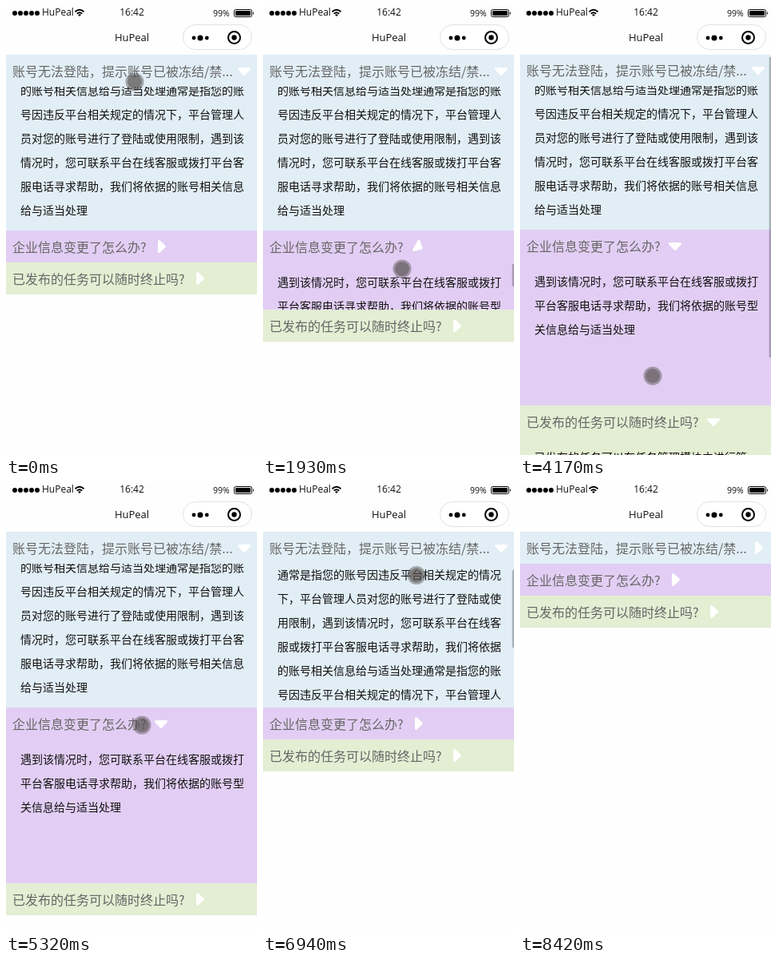
An HTML page for the animation above (9030 ms loop, 314x562 px).

```html
<!DOCTYPE html>
<html lang="zh-CN">
<head>
<meta charset="utf-8">
<style>
  html, body { margin: 0; width: 100%; height: 100%; overflow: hidden; background: #fff; }
  #stage { display: block; width: 314px; height: 562px; }
  text { font-family: "Noto Sans CJK SC", "Noto Sans CJK", sans-serif; text-spacing-trim: space-all; }
  .latin { font-family: "Open Sans", "Noto Sans", sans-serif; fill: #111; }
  .title { font-size: 16px; fill: #666; }
  .line { font-size: 14px; fill: #111; }
  .bar { fill: #000; fill-opacity: .26; }
</style>
</head>
<body>
<svg id="stage" viewBox="0 0 314 562">
  <rect width="314" height="562" fill="#fefefe"/>
  <svg id="page" y="61" width="314" height="501"></svg>
  <path d="M11 9h28.500" stroke="#000" stroke-width="6" stroke-linecap="round" stroke-dasharray="0 7"/>
  <text class="latin" x="45" y="12" font-size="12">HuPeal</text>
  <path d="M86.500 7.200Q92 2.400 97.500 7.200M88.700 9.600Q92 6.800 95.300 9.600" fill="none" stroke="#000" stroke-width="1.800"/>
  <path d="M92 13l-2-2q2-1.500 4 0z"/>
  <text class="latin" x="157.500" y="12" font-size="12" text-anchor="middle">16:42</text>
  <text class="latin" x="259" y="13" font-size="10.500">99%</text>
  <rect x="285.500" y="4.500" width="22" height="9" rx="2" fill="none" stroke="#000"/>
  <rect x="287" y="6" width="19" height="6" rx="1"/>
  <path d="M309 7q2 2 0 4z"/>
  <text class="latin" x="157.500" y="44" font-size="13" text-anchor="middle">HuPeal</text>
  <rect x="221.500" y="23.500" width="86" height="31" rx="15.500" fill="#fff" stroke="#e2e2e2"/>
  <circle cx="235" cy="40" r="2.400"/>
  <circle cx="243" cy="40" r="3.500"/>
  <circle cx="251.300" cy="40" r="2.400"/>
  <circle cx="285.500" cy="39.500" r="7.500" fill="none" stroke="#000" stroke-width="2"/>
  <circle cx="285.500" cy="39.500" r="3.200"/>
  <g id="touch">
    <circle r="11.500" fill="#55504e" fill-opacity=".45"/>
    <circle r="9" fill="#55504e" fill-opacity=".5"/>
  </g>
</svg>
<script>
const LOOP = 9030, TICKS = 117;
const VIEW = 501, HEAD = 40, OPEN = 180, LINE = 30, PADDING = 10;
const FOLD_TICKS = 5.2, BAR_LINGER = 3;

// All times are in ticks; a panel folds or unfolds at each of its toggles.
const panels = [
  {
    color: "#e2eef6", arrowX: 298, title: "账号无法登陆，提示账号已被冻结/禁...",
    text: ("通常是指您的账号因违反平台相关规定的情况下，平台管理人员对您的账号进行了登陆或使用限制，"
      + "遇到该情况时，您可联系平台在线客服或拨打平台客服电话寻求帮助，"
      + "我们将依据的账号相关信息给与适当处理").repeat(2),
    startOpen: 1, startScroll: 140, toggles: [3, 15, 102]
  },
  {
    color: "#e2cef4", arrowX: 194, title: "企业信息变更了怎么办?",
    text: "遇到该情况时，您可联系平台在线客服或拨打平台客服电话寻求帮助，"
      + "我们将依据的账号型关信息给与适当处理",
    startOpen: 0, startScroll: 0, toggles: [23, 70]
  },
  {
    color: "#e3eed3", arrowX: 242, title: "已发布的任务可以随时终止吗?",
    text: "已发布的任务可以在任务管理模块中进行管理，任务在“待审核”与“已通过”状态是可关闭，"
      + "如遇到必须关闭情况，您可联系平台在线客服或拨打平台客服电话寻求帮助，"
      + "我们将依据的任务相关信息给与适当处理）",
    startOpen: 0, startScroll: 0, toggles: [36, 62]
  }
];

const drag = (target, from, to, x, y, speed) => ({ target, from, to, x, y, speed });
const tap = (at, x, y, drift = 17) => drag(null, at, at + 1, x, y, drift);

const touches = [
  tap(0, 161, 95, -17),
  tap(12, 160, 78, 0),
  tap(24, 174, 312),
  tap(34, 166, 522),
  drag("page", 41, 45, 226, 616, -44),
  drag("page", 49, 55, 166, 305, 31.6),
  tap(59, 166, 524, 0),
  tap(69, 170, 303, 0),
  drag(panels[0], 78, 84, 205, 121, 22.3),
  drag(panels[0], 86, 97, 192, 120, -1.1),
  tap(98, 190, 98, -9)
];

const clamp = (x, low, high) => Math.min(Math.max(x, low), high);
const smooth = x => x * x * (3 - 2 * x);
const dragged = (touch, tick) => touch.speed * (clamp(tick, touch.from, touch.to) - touch.from);
const dragsOf = target => touches.filter(touch => touch.target === target);

// Twenty characters per line; closing punctuation never starts one.
const wrap = text => text.match(/.{1,20}(?![，）])/g);

function openness({ startOpen, toggles }, tick) {
  return toggles.reduce((sum, at, i) => {
    const step = smooth(clamp((tick - at) / FOLD_TICKS, 0, 1));
    return sum + (i % 2 === startOpen ? step : -step);
  }, startOpen);
}

function scrollOf(target, start, max, tick) {
  return dragsOf(target).reduce((scroll, touch) =>
    clamp(scroll - dragged(touch, tick), 0, Math.max(0, max)), start);
}

function barShown(panel, tick) {
  const within = (from, to) => tick >= from && tick <= to + BAR_LINGER;
  return panel.toggles.some(at => within(at, at + FOLD_TICKS))
    || dragsOf(panel).some(touch => within(touch.from, touch.to));
}

function set(node, attributes) {
  for (const name in attributes) node.setAttribute(name, attributes[name]);
}

function placeBar(node, top, view, content, scroll, shown) {
  set(node, {
    y: top + 2 + scroll * view / content,
    height: Math.max(0, view * view / content - 4),
    opacity: shown && content > view + 1 ? 1 : 0
  });
}

const page = document.getElementById("page");
const touchMark = document.getElementById("touch");

function build() {
  const bar = '<rect class="bar" x="311.7" width="2.3" rx="1"/>';
  page.innerHTML = `<g>${panels.map(p => `
    <g>
      <rect width="314" fill="${p.color}"/>
      <text class="title" x="8" y="27">${p.title}</text>
      <path d="M-2.5 -6.5L4.5 0L-2.5 6.5Z" fill="#fff" stroke="#fff" stroke-width="3" stroke-linejoin="round"/>
      <svg y="${HEAD}" width="314"><g>${wrap(p.text).map((line, i) =>
        `<text class="line" x="18" y="${LINE * (i + 1)}">${line}</text>`).join("")}</g></svg>
      ${bar}
    </g>`).join("")}</g>${bar}`;
  panels.forEach((p, i) => {
    p.node = page.firstElementChild.children[i];
    [p.back, , p.arrow, p.body, p.thumb] = p.node.children;
    p.content = wrap(p.text).length * LINE + 2 * PADDING;
  });
}

function draw(tick) {
  let top = 0;
  for (const p of panels) {
    const open = openness(p, tick);
    const height = OPEN * open;
    const scroll = scrollOf(p, p.startScroll, p.content - OPEN, tick);
    set(p.node, { transform: `translate(0 ${top})` });
    set(p.back, { height: HEAD + height });
    set(p.arrow, { transform: `translate(${p.arrowX} 20) rotate(${90 * open})` });
    set(p.body, { height });
    set(p.body.firstElementChild, { transform: `translate(0 ${-scroll})` });
    placeBar(p.thumb, HEAD, height, p.content, scroll, barShown(p, tick));
    top += HEAD + height;
  }

  const scroll = scrollOf("page", 0, top - VIEW, tick);
  const [list, thumb] = page.children;
  set(list, { transform: `translate(0 ${-scroll})` });
  placeBar(thumb, 0, VIEW, top, scroll, true);

  const touch = touches.find(t => tick >= t.from && tick <= t.to);
  set(touchMark, touch
    ? { transform: `translate(${touch.x} ${touch.y + dragged(touch, tick)})`, opacity: 1 }
    : { opacity: 0 });
}

const start = performance.now();

function frame() {
  const time = (performance.now() - start) % LOOP;
  draw(Math.floor(time * TICKS / LOOP + 0.16) % TICKS);
  requestAnimationFrame(frame);
}

build();
frame();
</script>
</body>
</html>
```
